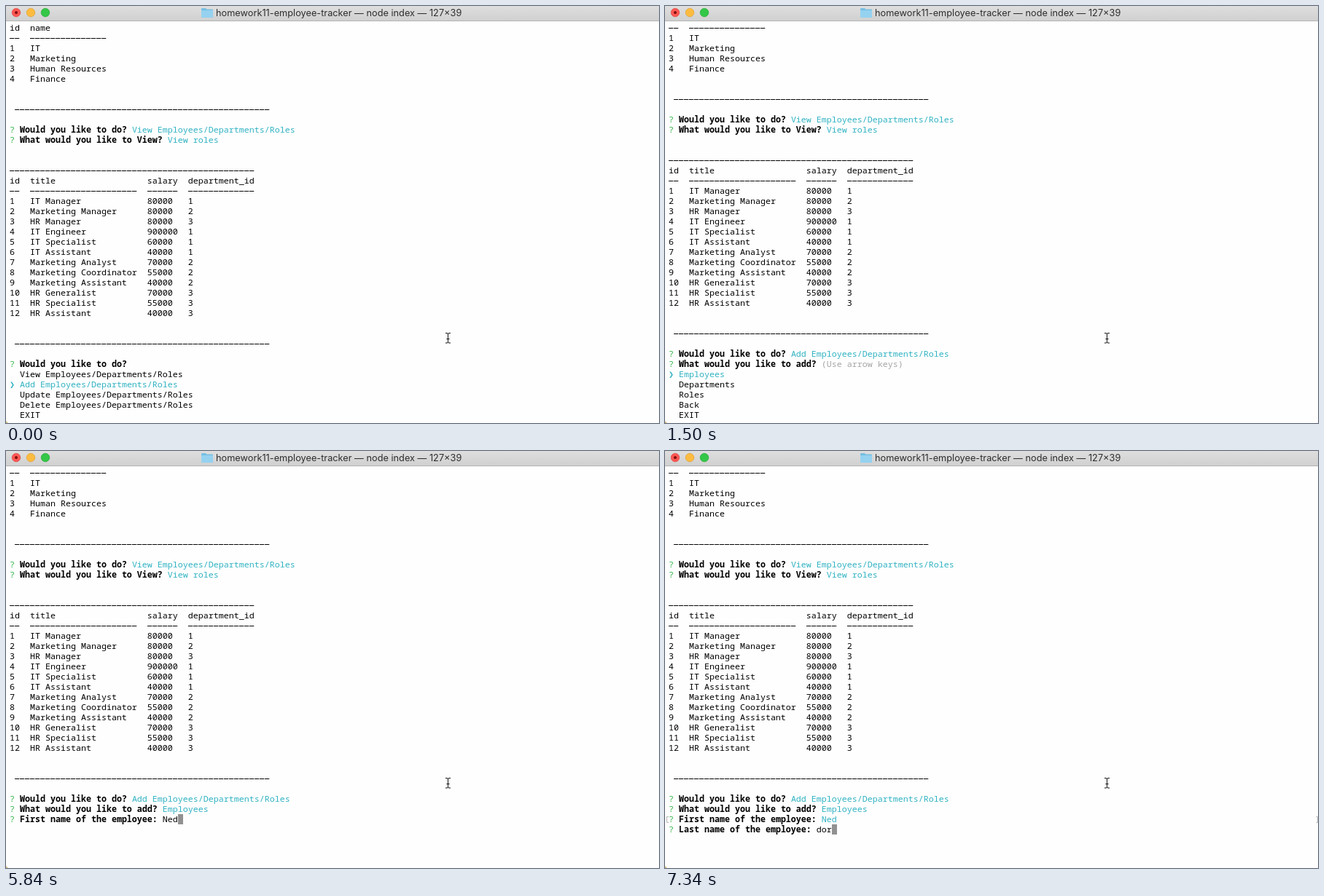
Recreate the animation shown at these times as an HTML page. Size 896 by 573 pixels, loop 8000 ms.

```html
<!DOCTYPE html>
<html lang="en">
<head>
<meta charset="utf-8">
<title>Employee tracker</title>
<style>
html, body { margin: 0; width: 100%; height: 100%; overflow: hidden; background: #fefefe; }
svg { position: absolute; left: 0; top: 0; }
pre {
  position: absolute; left: 5px; top: 23px; margin: 0; color: #000;
  font: 11.667px/14px "Noto Sans Mono", "DejaVu Sans Mono", monospace;
  font-variant-ligatures: none;
}
b { font-weight: 700; }
.green { color: #35b44a; }
.cyan { color: #2fb2c2; }
.dim { color: #a5a5a5; }
.rule, .caret { display: inline-block; height: 14px; vertical-align: top; }
.rule {
  color: transparent;
  background: repeating-linear-gradient(90deg, #000 0 6px, #bbb 6px 7px) 0 7px / 100% 1px no-repeat;
}
.caret { width: 7px; background: #919191; }
</style>
</head>
<body>
<svg width="896" height="573">
  <defs>
    <linearGradient id="bar" x2="0" y2="1">
      <stop stop-color="#dedede"/><stop offset="1" stop-color="#d0d0d0"/>
    </linearGradient>
  </defs>
  <rect width="896" height="20" fill="url(#bar)"/>
  <rect y="20" width="896" height="1" fill="#b4b4b4"/>
  <g stroke-width=".7">
    <circle cx="14" cy="9" r="5.8" fill="#fc5753" stroke="#df4744"/>
    <circle cx="34" cy="9" r="5.8" fill="#fdbc40" stroke="#de9f34"/>
    <circle cx="54" cy="9" r="5.8" fill="#34c748" stroke="#27aa35"/>
  </g>
  <circle cx="14" cy="9" r="2" fill="#7a0d0b"/>
  <path d="M268 4q0-1 1-1h5l1.500 1.500h7.500q1 0 1 1V15q0 1-1 1h-14q-1 0-1-1z" fill="#76bfe3"/>
  <path d="M268 6h16v9q0 1-1 1h-14q-1 0-1-1z" fill="#95d2f0"/>
  <text x="288" y="14" font-family="Inter, sans-serif" font-size="12.75" fill="#2e2e2e">homework11-employee-tracker — node index — 127×39</text>
  <path d="M603 449.500h2q1.500 0 1.500 1.500v10.500q0 1.500-1.500 1.500h-2M610 449.500h-2q-1.500 0-1.500 1.500v10.500q0 1.500 1.500 1.500h2M604.500 457.500h4" fill="none" stroke="#111"/>
  <path d="M0 570v3h3z" fill="#d8bd84"/>
  <path id="marks" d="M5 502.500h-2.500v8h2.500M893.500 502.500h2v8h-2" fill="none" stroke="#b5b5b5"/>
</svg>
<pre id="screen"></pre>
<script>
const LOOP = 8000;
const screen = document.getElementById("screen");
const marks = document.getElementById("marks");

const rule = n => `<span class="rule">${"-".repeat(n)}</span>`;
const cyan = s => `<span class="cyan">${s}</span>`;
const ask = (question, rest = "") => `<span class="green">?</span> <b>${question}</b> ${rest}`;
const menu = (items, chosen) => items.map((s, i) => i === chosen ? cyan("❯ " + s) : "  " + s);
const input = s => s + '<span class="caret"></span>';

const actions = ["View", "Add", "Update", "Delete"].map(s => s + " Employees/Departments/Roles");
const kinds = ["Employees", "Departments", "Roles", "Back", "EXIT"];
const departments = ["IT", "Marketing", "Human Resources", "Finance"];
const roles = [
  ["IT Manager", 80000, 1], ["Marketing Manager", 80000, 2], ["HR Manager", 80000, 3],
  ["IT Engineer", 900000, 1], ["IT Specialist", 60000, 1], ["IT Assistant", 40000, 1],
  ["Marketing Analyst", 70000, 2], ["Marketing Coordinator", 55000, 2], ["Marketing Assistant", 40000, 2],
  ["HR Generalist", 70000, 3], ["HR Specialist", 55000, 3], ["HR Assistant", 40000, 3]
];
const row = (id, title, salary, dept) =>
  String(id).padEnd(4) + title.padEnd(23) + String(salary).padEnd(8) + dept;

const history = [
  "id  name",
  rule(2) + "  " + rule(15),
  ...departments.map((s, i) => String(i + 1).padEnd(4) + s),
  "", "", " " + rule(50), "",
  ask("Would you like to do?", cyan(actions[0])),
  ask("What would you like to View?", cyan("View roles")),
  "", "", rule(48),
  row("id", "title", "salary", "department_id"),
  [2, 21, 6, 13].map(rule).join("  "),
  ...roles.map((r, i) => row(i + 1, ...r)),
  "", "", " " + rule(50), ""
];

function prompt(t) {
  if (t < 1500) {
    const chosen = t >= 600 && t < 900 ? 2 : 1;
    return [ask("Would you like to do?"), ...menu([...actions, "EXIT"], chosen)];
  }
  const lines = [ask("Would you like to do?", cyan(actions[1]))];
  const add = "What would you like to add?", first = "First name of the employee:";
  if (t < 2550)
    return [...lines, ask(add, '<span class="dim">(Use arrow keys)</span>'), ...menu(kinds, 0)];
  lines.push(ask(add, cyan(kinds[0])));
  if (t < 6440) {
    const typed = t < 5540 ? 0 : t < 5840 ? 2 : 3;
    return [...lines, ask(first, input("Ned".slice(0, typed)))];
  }
  const typed = t < 7190 ? 0 : t < 7340 ? 2 : 3;
  return [...lines, ask(first, cyan("Ned")),
    ask("Last name of the employee:", input("dor".slice(0, typed)))];
}

let shown;
function draw(now) {
  const t = now % LOOP;
  const html = [...history.slice(t < 1500 ? 0 : 1), ...prompt(t)].join("\n");
  if (html !== shown) screen.innerHTML = shown = html;
  marks.style.display = t < 6440 ? "none" : "";
  requestAnimationFrame(draw);
}
draw(performance.now());
</script>
</body>
</html>
```
